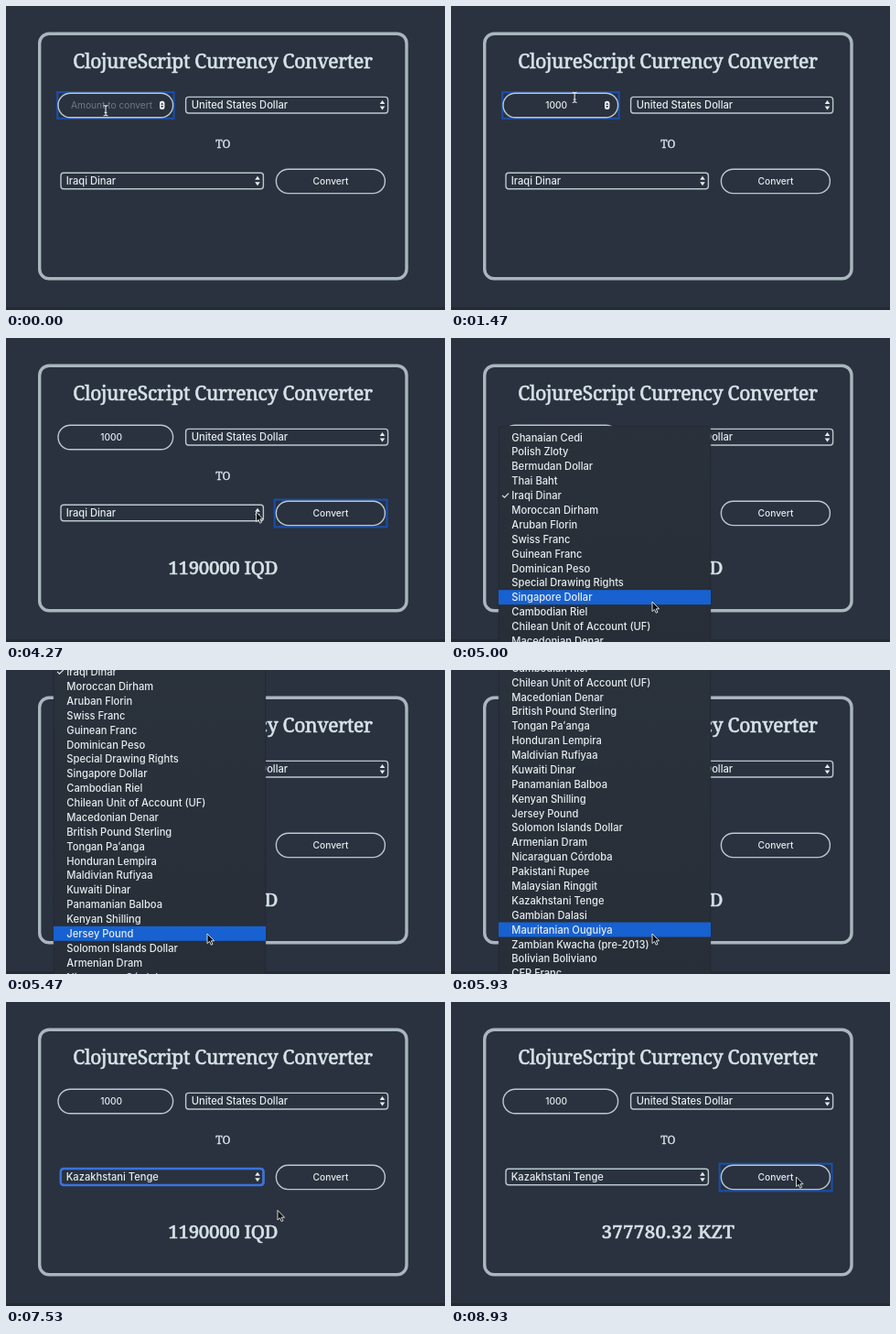
Write an HTML page that moves like this. It is 480 px wide and 332 px high and loops after 8.99 s.

```html
<!DOCTYPE html>
<html lang="en">
<head>
<meta charset="utf-8">
<title>Currency Converter</title>
<style>
  html, body { margin: 0; width: 100%; height: 100%; overflow: hidden; background: #29323e; }
  svg { display: block; width: 480px; height: 332px; }
  text { font-family: Inter, Roboto, sans-serif; font-weight: 500; fill: #e6ecef; }
  .slab { font-family: "Noto Serif", serif; font-weight: 400; fill: #d6e2e8; stroke: #d6e2e8; stroke-width: .7; text-anchor: middle; }
  .title { font-size: 21px; letter-spacing: -.24px; }
  .to { font-size: 12px; stroke-width: .4; }
  .result { font-size: 20.5px; }
  .mid { text-anchor: middle; font-size: 10.2px; }
  .option { font-size: 11.15px; }
  .hint { fill: #6f7a84; font-weight: 400; }
  .box { fill: none; stroke: #bcc8cf; stroke-width: 1.4; }
  .ring { fill: none; stroke: #1c4da8; stroke-width: 2.2; }
  .ring.bright { stroke: #3a73dc; stroke-width: 2.5; }
  .mark { fill: #e6ecef; }
</style>
</head>
<body>
<svg viewBox="0 0 480 332">
  <defs>
    <linearGradient id="shade" gradientUnits="userSpaceOnUse" x1="0" y1="0" x2="0" y2="332">
      <stop offset="0" stop-color="#2a323c"/>
      <stop offset="1" stop-color="#272e37"/>
    </linearGradient>
    <path id="arrows" d="M-2.8 -1.3L0 -5.2L2.8 -1.3ZM-2.8 1.3L0 5.2L2.8 1.3Z"/>
  </defs>
  <rect width="480" height="332" fill="#29323e"/>
  <rect y="329" width="480" height="3" fill="#222a34"/>
  <rect x="36.7" y="30.2" width="401.3" height="267.6" rx="10.5" fill="none" stroke="#a9b6be" stroke-width="3.4"/>
  <text class="slab title" x="237" y="68.3">ClojureScript Currency Converter</text>

  <rect id="inputRing" class="ring" x="56.2" y="94.2" width="127.4" height="28.6"/>
  <rect class="box" x="57" y="95.2" width="125.6" height="26.6" rx="13.3"/>
  <text id="hint" class="mid hint" x="115.5" y="112.3">Amount to convert</text>
  <text id="amount" class="mid" x="115.2" y="112.3"></text>
  <g id="spinner">
    <rect x="168" y="103.7" width="5.4" height="9.4" rx="2.5" fill="#f2f5f6"/>
    <use href="#arrows" transform="translate(170.7 108.4) scale(.55)" fill="#29323e"/>
  </g>

  <rect class="box" x="196.6" y="99.4" width="221" height="17.6" rx="3"/>
  <text class="option" x="202.7" y="112.3">United States Dollar</text>
  <use href="#arrows" class="mark" x="411.5" y="108.2"/>

  <text class="slab to" x="237.3" y="155">TO</text>

  <rect class="box" x="60" y="182.2" width="221.4" height="17.6" rx="3"/>
  <rect id="selectRing" class="ring bright" x="59.8" y="182" width="221.8" height="18" rx="3"/>
  <text id="choice" class="option" x="65.7" y="195.2"></text>
  <use href="#arrows" class="mark" x="275" y="191"/>

  <rect id="buttonRing" class="ring" x="293.7" y="176.7" width="122.8" height="29.6"/>
  <rect class="box" x="295.4" y="178.2" width="119" height="26.4" rx="13.2"/>
  <text class="mid" x="355" y="195">Convert</text>

  <text id="result" class="slab result" x="237.3" y="258.2"></text>

  <g id="menu">
    <rect id="sheet" x="52.3" width="231.4" rx="4" fill="url(#shade)" stroke="#222931" stroke-width=".8"/>
    <rect id="bar" x="52" width="232" height="16" fill="#1761d0"/>
    <g id="list"></g>
  </g>

  <g id="cursor">
    <path id="pointer" d="M0 0V10.6L2.5 8.4L4.2 12.2L6 11.4L4.3 7.8H7.6Z" fill="#0b0d10" stroke="#e9eef0" stroke-width=".9"/>
    <path id="beam" d="M-2.4 -5.4Q0 -5.4 0 -3.8Q0 -5.4 2.4 -5.4M0 -4V4.4M-2.4 5.8Q0 5.8 0 4.2Q0 5.8 2.4 5.8M-1.4 2.4H1.4" fill="none" stroke="#e4eaed" stroke-width="1.1"/>
  </g>
</svg>
<script>
const LOOP = 8990, STEP = 200 / 3, ROW = 15.88, CHECKED = 4;
const $ = id => document.getElementById(id);

const currencies = `Ghanaian Cedi|Polish Zloty|Bermudan Dollar|Thai Baht|Iraqi Dinar|Moroccan Dirham|Aruban Florin|Swiss Franc|Guinean Franc|Dominican Peso|Special Drawing Rights|Singapore Dollar|Cambodian Riel|Chilean Unit of Account (UF)|Macedonian Denar|British Pound Sterling|Tongan Paʻanga|Honduran Lempira|Maldivian Rufiyaa|Kuwaiti Dinar|Panamanian Balboa|Kenyan Shilling|Jersey Pound|Solomon Islands Dollar|Armenian Dram|Nicaraguan Córdoba|Pakistani Rupee|Malaysian Ringgit|Kazakhstani Tenge|Gambian Dalasi|Mauritanian Ouguiya|Zambian Kwacha (pre-2013)|Bolivian Boliviano|CFP Franc`.split('|');

// [time, x, y]
const path = [
  [1400, 109, 114], [1530, 160, 86], [1600, 203, 105], [1670, 180, 136],
  [1870, 180, 136], [2000, 132, 132], [2530, 289, 187], [2670, 289, 187],
  [3000, 350, 192], [3670, 350, 192], [4200, 273.5, 190], [4600, 273.5, 190],
  [4800, 220, 288], [6270, 220, 288], [6530, 221, 251], [6930, 221, 251],
  [7530, 295.5, 228], [7730, 384, 194], [7800, 377.5, 191]
];
// [time, y of the checked row]
const scroll = [
  [4930, 191], [5000, 172], [5130, 105], [5270, 45], [5400, 8], [5470, 1.7],
  [5730, 1.7], [5800, -55], [5870, -106], [5930, -129.3], [6070, -131.5]
];

function track(keys, t) {
  const i = keys.findIndex(k => k[0] > t);
  if (i === 0) return keys[0].slice(1);
  if (i < 0) return keys[keys.length - 1].slice(1);
  const a = keys[i - 1], b = keys[i], f = (t - a[0]) / (b[0] - a[0]);
  return a.slice(1).map((v, n) => v + (b[n + 1] - v) * f);
}

function addText(parent, x, y, label) {
  const el = document.createElementNS('http://www.w3.org/2000/svg', 'text');
  el.setAttribute('class', 'option');
  el.setAttribute('x', x);
  el.setAttribute('y', y);
  el.textContent = label;
  parent.append(el);
}
currencies.forEach((name, i) => addText($('list'), 66.3, (i - CHECKED) * ROW + 4.1, name));
addText($('list'), 54.5, 4.1, '✓');

const show = (id, on) => { $(id).style.display = on ? '' : 'none'; };
function setText(id, value) {
  if ($(id).textContent !== value) $(id).textContent = value;
}

function draw(t) {
  const digits = [70, 470, 600, 930].filter(at => t >= at - 5).length;
  show('hint', !digits);
  setText('amount', '1000'.slice(0, digits));

  const onInput = t < 2995, onSelect = t >= 4325 && t < 7995;
  show('inputRing', onInput);
  show('spinner', onInput);
  show('selectRing', onSelect);
  show('buttonRing', !onInput && !onSelect);
  setText('choice', t < 6995 ? 'Iraqi Dinar' : 'Kazakhstani Tenge');

  const converted = t >= 8265;
  setText('result', t < 3325 ? '' : converted ? '377780.32 KZT' : '1190000 IQD');
  $('result').style.letterSpacing = converted ? '.35px' : '-.3px';

  const [x, y] = track(path, t);
  const [base] = track(scroll, t);
  show('menu', t >= 4325 && t < 7130);
  $('menu').style.opacity = Math.min(1, Math.max(0, (7130 - t) / 200));
  const top = Math.max(-6, base - CHECKED * ROW - 12);
  $('sheet').setAttribute('y', top);
  $('sheet').setAttribute('height', 340 - top);
  const row = Math.round((y + 1 - base) / ROW);
  $('bar').setAttribute('y', base + row * ROW - 8);
  $('list').setAttribute('transform', `translate(0 ${base})`);

  const overInput = x > 57 && x < 183 && y > 95 && y < 122;
  show('cursor', t < 65 || t >= 1395);
  show('beam', overInput);
  show('pointer', !overInput);
  $('cursor').setAttribute('transform', `translate(${x} ${y})`);
}

const start = performance.now();
function tick() {
  const t = (performance.now() - start) % LOOP;
  draw(Math.floor((t + 5) / STEP) * STEP);
  requestAnimationFrame(tick);
}
tick();
</script>
</body>
</html>
```
